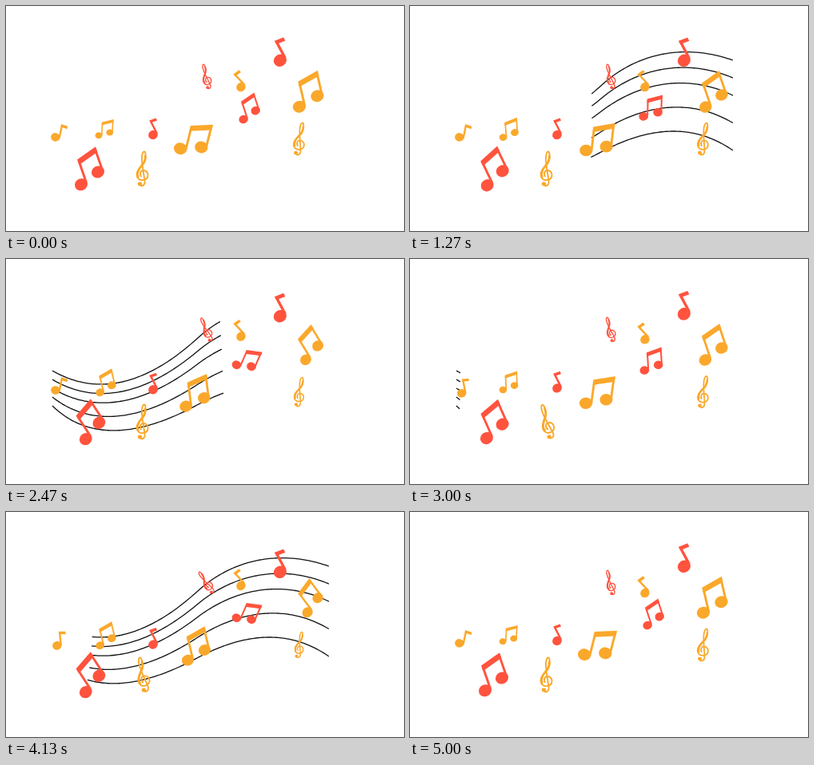
Write an HTML page with a canvas that moves like this. It is 498 by 282 pixels and loops after 5.03 s.

```html
<!DOCTYPE html>
<html>
<head>
<meta charset="utf-8">
<style>
html, body { margin: 0; width: 100%; height: 100%; overflow: hidden; background: #fff; }
canvas { display: block; }
</style>
</head>
<body>
<canvas id="stage" width="498" height="282"></canvas>
<script>
const ctx = document.getElementById('stage').getContext('2d');
const LOOP = 5030, STEP = 100 / 3, FRAMES = 150;
const RED = '#ff533e', ORANGE = '#faa82b';
const clamp = v => Math.max(0, Math.min(1, v));

// Staff: the outer lines are two joined cubic curves, the inner ones blend between them.
const STAFF_X = [58, 100, 160, 240, 285, 345, 404];
const TOP = [140, 164, 172, 99, 58, 47, 68];
const BOTTOM = [184, 225, 226, 182.5, 159, 140, 181];
const SAMPLES = 80;

function bezier(p, i, u) {
  const v = 1 - u;
  return v * v * v * p[i] + 3 * v * v * u * p[i + 1] + 3 * v * u * u * p[i + 2] + u * u * u * p[i + 3];
}

function staffLine(u) {
  const bend = 0.11 * Math.sin(Math.PI * u) ** 2;
  const ys = TOP.map((y, j) => y + (BOTTOM[j] - y) * (j ? u - bend : u));
  const pts = [];
  let len = 0;
  for (let k = 0; k <= 2 * SAMPLES; k++) {
    const half = k < SAMPLES ? 0 : 1, s = k / SAMPLES - half;
    const x = bezier(STAFF_X, 3 * half, s), y = bezier(ys, 3 * half, s);
    const last = pts[k - 1];
    if (last) len += Math.hypot(x - last.x, y - last.y);
    pts.push({ x, y, len });
  }
  return pts;
}

const staff = [0, 1, 2, 3, 4].map(i => staffLine(i / 4));

// The lines draw on and wipe off, run backwards, then play forwards again.
function drawStaff(f) {
  const half = 45.2;
  const p = f < 2 * half ? half - Math.abs(f - half) : f - 2 * half - 0.6;
  const head = clamp(p / 26.2), tail = clamp((p - 31) / 14.3);
  if (head <= tail) return;
  ctx.strokeStyle = '#111';
  ctx.lineWidth = 1.3;
  for (const pts of staff) {
    const total = pts[pts.length - 1].len;
    ctx.setLineDash([(head - tail) * total, 2 * total]);
    ctx.lineDashOffset = -tail * total;
    ctx.beginPath();
    for (const q of pts) ctx.lineTo(q.x, q.y);
    ctx.stroke();
  }
  ctx.setLineDash([]);
}

// Beats run from 0 (rest) to 1 (far pose) and close over the loop.
const pulse = cycles => (1 - Math.cos(2 * Math.PI * cycles)) / 2;
const swing = u => pulse(3 * u);
const tilt = u => pulse(4 * u);
const drift = u => pulse(3 * u + 0.3 * Math.sin(Math.PI * u));
const roll = u => (swing(u) + drift(u)) / 2;

function blob(x, y, rx, ry) {
  ctx.beginPath();
  ctx.ellipse(x, y, rx, ry, -0.1, 0, 2 * Math.PI);
  ctx.fill();
}

function stem(x, y1, y2, w) {
  ctx.fillRect(x - w / 2, y1, w, y2 - y1);
}

function bar(x1, y1, x2, y2, w) {
  ctx.beginPath();
  ctx.moveTo(x1, y1);
  ctx.lineTo(x2, y2);
  ctx.lineTo(x2, y2 + w);
  ctx.lineTo(x1, y1 + w);
  ctx.fill();
}

function pair() {
  blob(-17.5, 18, 8.2, 7.4);
  blob(7.5, 10, 8.2, 7.4);
  stem(-10.6, -11, 18, 2.9);
  stem(13.5, -19, 10, 2.9);
  bar(-12, -13, 15, -21, 7);
}

function single() {
  blob(-4, 9.5, 8.2, 7.6);
  stem(3, -12, 10, 3.4);
  bar(1.3, -15.5, 13.4, -14, 4.8);
}

const CURL = new Path2D('M-1 10C-4 7-2 2 1 2C6 2 7.5 6 7 9C6 15-3 16-6 11C-9 5-4 0 0-5' +
  'C4-9 4.5-14 4-19C3.5-23 1-22 0-18C-2-12 1 0 3 15C4 21-1 23-3 20');
const BELLY = new Path2D('M-5 11C-8 5-4 0 0-5C3-8 4-12 4-17');

function clef() {
  ctx.lineWidth = 1.9;
  ctx.stroke(CURL);
  ctx.lineWidth = 2.8;
  ctx.stroke(BELLY);
  blob(-3, 19, 2.7, 2.5);
}

// turn, lift and grow describe the far pose relative to rest.
const pieces = [
  { shape: single, color: ORANGE, beat: tilt, x: 66, y: 158.5, size: .7, rot: 12, turn: -26, lift: 3 },
  { shape: pair, color: ORANGE, beat: swing, x: 126, y: 153, size: .54, rot: 3, turn: -17, grow: 1.22 },
  { shape: pair, color: RED, beat: swing, x: 104.7, y: 201, size: 1, rot: -19, turn: -14 },
  { shape: single, color: RED, beat: drift, x: 183.5, y: 154, size: .73, rot: -27, lift: 5.5 },
  { shape: clef, color: ORANGE, beat: tilt, x: 170.5, y: 204, size: 1, rot: 0, turn: -22 },
  { shape: pair, color: ORANGE, beat: roll, x: 239.5, y: 165.5, size: 1, rot: 14, turn: -30, grow: .93 },
  { shape: clef, color: RED, beat: drift, x: 250, y: 88.5, size: .72, rot: -18, turn: -25 },
  { shape: single, color: ORANGE, beat: drift, x: 291.4, y: 94.5, size: .73, rot: -43, lift: -11 },
  { shape: pair, color: RED, beat: swing, x: 305, y: 126, size: .71, rot: -18, turn: 42 },
  { shape: single, color: RED, beat: drift, x: 342, y: 58, size: 1, rot: -28, lift: 8.5 },
  { shape: pair, color: ORANGE, beat: roll, x: 380, y: 104.7, size: 1, rot: -13, turn: -26, grow: .83 },
  { shape: clef, color: ORANGE, beat: drift, x: 367, y: 166.5, size: .94, rot: 5, grow: .76 }
];

function drawPiece({ shape, color, beat, x, y, size, rot, turn = 0, lift = 0, grow = 1 }, u) {
  const w = beat(u), s = size * (1 + (grow - 1) * w);
  ctx.save();
  ctx.fillStyle = ctx.strokeStyle = color;
  ctx.translate(x, y + lift * w);
  ctx.rotate((rot + turn * w) * Math.PI / 180);
  ctx.scale(s, s);
  shape();
  ctx.restore();
}

const start = performance.now();

function frame() {
  const t = (performance.now() - start) % LOOP;
  const f = Math.min(FRAMES, Math.floor((t + 4) / STEP));
  ctx.fillStyle = '#fff';
  ctx.fillRect(0, 0, 498, 282);
  drawStaff(f);
  for (const p of pieces) drawPiece(p, f / FRAMES);
  requestAnimationFrame(frame);
}
frame();
</script>
</body>
</html>
```
